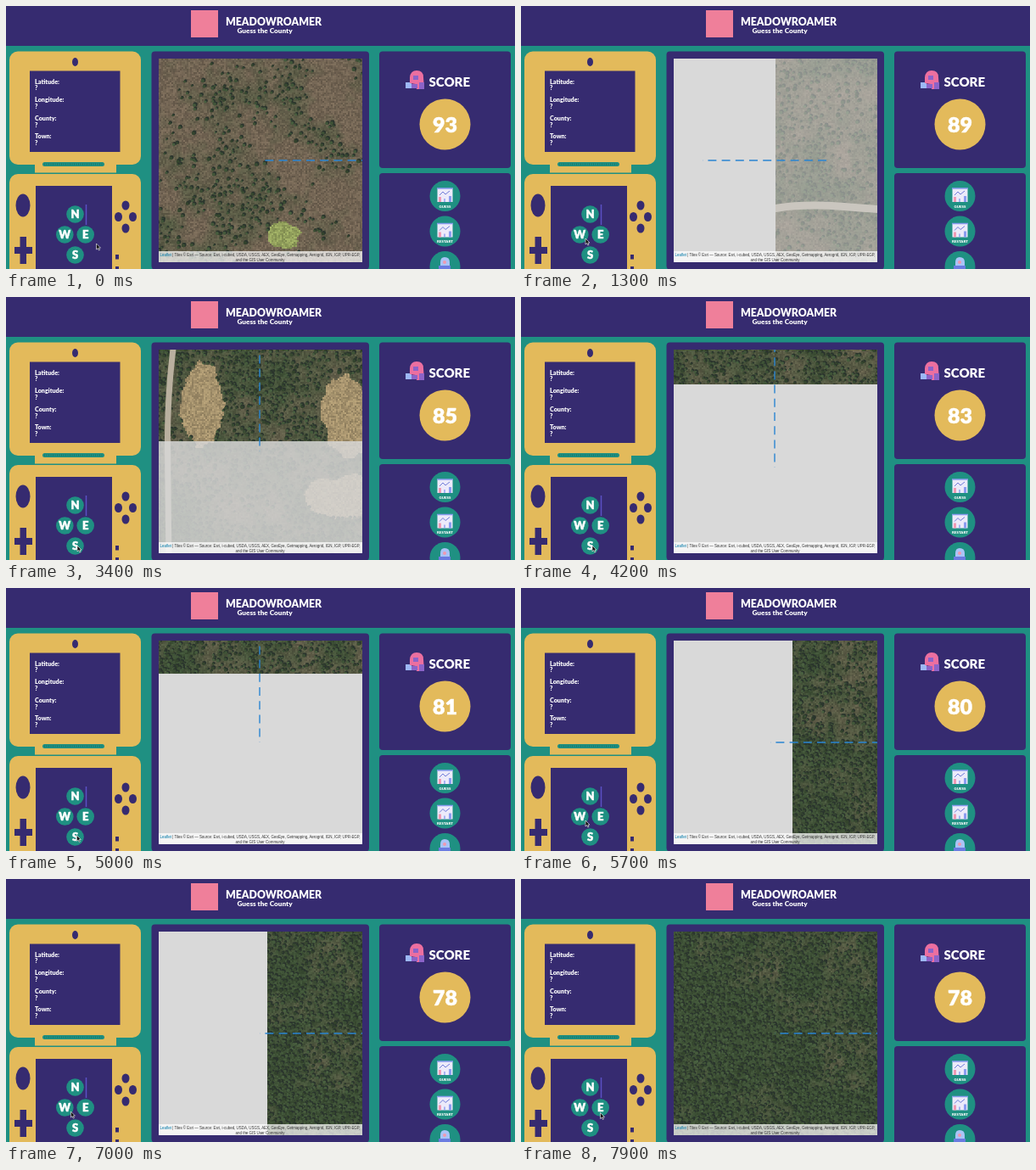
An HTML page with a canvas that plays this animation: 600 by 310 pixels, repeating every 8 s.

```html
<!DOCTYPE html>
<html lang="en">
<head>
<meta charset="utf-8">
<title>Guess the County</title>
<style>
  html, body { margin: 0; width: 100%; height: 100%; overflow: hidden; background: #1f9082; }
  #stage { position: relative; width: 600px; height: 310px; overflow: hidden; }
  svg { position: absolute; inset: 0; }
  canvas { position: absolute; left: 180px; top: 62px; }
  text { font-family: Lato, "Open Sans", sans-serif; font-weight: 900; fill: #fff; }
  .mid { text-anchor: middle; }
  .thick { stroke: #fff; stroke-width: .5; }
  .credit text { font: 4.45px "Liberation Sans", Arial, sans-serif; fill: #333; }
  .p { fill: #362b70; }
  .g { fill: #e3ba5b; }
  .t { fill: #1f9082; }
</style>
</head>
<body>
<div id="stage">
  <svg width="600" height="310" viewBox="0 0 600 310">
    <rect class="t" width="600" height="310"/>
    <rect class="p" width="600" height="47"/>
    <rect x="218" y="5" width="32" height="32" fill="#ef7f9a"/>
    <text x="259" y="22.700" font-size="12.300">MEADOWROAMER</text>
    <text class="mid" x="305" y="32" font-size="8.200">Guess the County</text>

    <!-- upper half of the console -->
    <rect class="g" x="4" y="53.500" width="155" height="133.500" rx="10"/>
    <path class="g" d="M34 186H130V196.500H34Z"/>
    <rect class="t" x="43" y="184" width="73" height="5" rx="2.500"/>
    <path d="M45 186.500H115" stroke="#187468" stroke-width="2" stroke-dasharray="1 1.500"/>
    <ellipse class="p" cx="81.500" cy="66" rx="3.500" ry="5"/>
    <rect class="p" x="28" y="76.500" width="106.500" height="95.500"/>
    <g id="facts" font-size="7.200"></g>

    <!-- lower half of the console -->
    <rect class="g" x="4" y="198" width="155" height="130" rx="10"/>
    <rect class="p" x="35" y="212" width="90" height="100"/>
    <g class="p">
      <ellipse cx="20" cy="235" rx="8.500" ry="13.500"/>
      <path d="M16.500 272h7.500v12h7v8h-7v12h-7.500v-12h-6.500v-8h6.500z"/>
      <g id="keys"></g>
      <rect x="129" y="293" width="4" height="5.500"/>
      <rect x="129" y="307" width="4" height="5"/>
    </g>
    <g id="pad" font-size="13"></g>
    <path d="M94.500 234V258" stroke="#5b50c4" stroke-width="1.500"/>

    <!-- panels -->
    <rect class="p" x="171.500" y="53.500" width="256.500" height="257" rx="4"/>
    <rect class="p" x="440" y="53.500" width="155" height="137.500" rx="4"/>
    <rect class="p" x="440" y="197" width="155" height="120" rx="4"/>

    <!-- score -->
    <path d="M471 90H478V97H471Z" fill="#9db8f5"/>
    <path d="M476 84q1-8 8-8 8 0 8 8l1 14h-9l-1-6-7-1z" fill="#ec6fa0"/>
    <path d="M480 82h6v5h-6zM478 92h7v5h-7zM487 90h6v8h-6z" fill="#8c63c8"/>
    <text x="498.500" y="94.500" font-size="15">SCORE</text>
    <circle class="g" cx="517.500" cy="139.500" r="30"/>
    <text id="score" class="mid thick" x="517.500" y="148.700" font-size="25">93</text>

    <!-- menu buttons -->
    <g id="menu"></g>
    <path d="M512 302q0-6 5-6 6 0 6 6v9h-11z" fill="#a9c4f7"/>
    <path d="M510 306h14v6h-14z" fill="#6a7be0"/>
    <circle cx="517" cy="302" r="2" fill="#ef9ab0"/>

    <path id="cursor" d="M0 0V7L1.700 5.500 2.800 8 4 7.500 2.900 5.100H5Z"
      fill="#111" stroke="#fff" stroke-width=".6"/>
  </svg>
  <canvas id="map" width="240" height="240"></canvas>
  <svg class="credit" width="600" height="310" viewBox="0 0 600 310">
    <rect x="180" y="289" width="240" height="13" fill="#fff" fill-opacity=".72"/>
    <text class="mid" x="299.500" y="294.500"><tspan fill="#0078a8">Leaflet</tspan> | Tiles © Esri — Source: Esri, i-cubed, USDA, USGS, AEX, GeoEye, Getmapping, Aerogrid, IGN, IGP, UPR-EGP,</text>
    <text class="mid" x="299.500" y="300.500">and the GIS User Community</text>
  </svg>
</div>
<script>
const $ = id => document.getElementById(id);
const LOOP = 8000, TICK = 100, STEP = 146, PAN = 250;
const TILE = 103, LATENCY = 380, FADE = 200, ORIGIN = [-498, -149];
const clamp = v => Math.max(0, Math.min(1, v));
const smooth = u => u * u * (3 - 2 * u);
const mix = (a, b, u) => a.map((v, i) => v + (b[i] - v) * u);

// Repeated parts of the interface
$('facts').innerHTML = ['Latitude', 'Longitude', 'County', 'Town'].map((label, i) => {
  const y = 91.5 + i * 21.6;
  return `<text x="34" y="${y}">${label}:</text><text x="34" y="${y + 7.8}">?</text>`;
}).join('');

const around = (x, y, r, ry = r) => [[x, y - ry], [x - r, y], [x + r, y], [x, y + ry]];

$('keys').innerHTML = around(141, 248.5, 8.5, 13.5)
  .map(([x, y]) => `<ellipse cx="${x}" cy="${y}" rx="4.5" ry="5.5"/>`).join('');

$('pad').innerHTML = around(81.5, 269.5, 12.2, 24).map(([x, y], i) =>
  `<circle class="t" cx="${x}" cy="${y}" r="10.3"/>
   <text class="mid thick" x="${x}" y="${y + 4.6}">${'NWES'[i]}</text>`).join('');

$('menu').innerHTML = ['GUESS', 'RESTART', ''].map((label, i) => {
  const y = 224 + i * 41.5, disc = `<circle class="t" cx="517.5" cy="${y}" r="18"/>`;
  return disc + (label && `
    <rect x="508.500" y="${y - 9}" width="18" height="16" fill="#eceafa"/>
    <path d="M508 ${y - 9}h19M517 ${y + 3}v4" stroke="#8a9cf0" stroke-width="1.4"/>
    <path d="M511 ${y - 1}l4-4 3 3 5-4" fill="none" stroke="#6f7bd8"/>
    <rect x="510" y="${y + 1}" width="3" height="6" fill="#f09ab4"/>
    <rect x="522" y="${y}" width="3" height="7" fill="#8c9df0"/>
    <text class="mid" x="517.5" y="${y + 13.5}" font-size="4.4">${label}</text>`);
}).join('');

// Bursts of clicks; clicks and pointer both follow from them
const rest = { W: [76, 274], S: [84, 293], E: [93.5, 275.5] };
const bursts = [
  { dir: 'W', at: 251, count: 4, gap: 330 },
  { dir: 'S', at: 1987, count: 4, gap: 250 },
  { dir: 'S', at: 3700, count: 4, gap: 340 },
  { dir: 'W', at: 5500, count: 2, gap: 460 },
  { dir: 'W', at: 6750, count: 1, gap: 0 }
];
const clicks = [], stops = [{ leave: 0, pos: [106.5, 280] }];
let spot = [0, 0];
for (const { dir, at, count, gap } of bursts) {
  for (let n = 0; n < count; n++) {
    const from = spot;
    spot = dir === 'W' ? [from[0] - STEP, from[1]] : [from[0], from[1] + STEP];
    clicks.push({ at: at + n * gap, from, to: spot });
  }
  stops.push({ arrive: at - 130, leave: at + (count - 1) * gap + 200, pos: rest[dir] });
}
stops.push({ arrive: 7500, leave: LOOP, pos: rest.E });

function pointerAt(t) {
  const i = stops.findIndex(s => s.leave >= t);
  if (i < 1) return stops[0].pos;
  const a = stops[i - 1], b = stops[i];
  return mix(a.pos, b.pos, smooth(clamp((t - a.leave) / (b.arrive - a.leave))));
}

function travel(t) {
  const done = clicks.filter(c => c.at <= t);
  const { at, from, to } = done.at(-1) || { at: -PAN, from: [STEP, 0], to: [0, 0] };
  const left = (1 - clamp((t - at) / PAN)) ** 2;
  return { from, to, cam: mix(to, from, left), score: 93 - done.length };
}

// Landscape in world coordinates; the starting view is centred on 0, 0
function hash(x, y, seed) {
  let h = Math.imul(x, 374761393) ^ Math.imul(y, 668265263) ^ Math.imul(seed, 1274126177);
  h = Math.imul(h ^ (h >>> 13), 1103515245);
  h = Math.imul(h ^ (h >>> 15), 2246822519);
  return ((h ^ (h >>> 16)) >>> 0) / 2 ** 32;
}

function noise(x, y, seed) {
  const i = Math.floor(x), j = Math.floor(y), u = smooth(x - i), v = smooth(y - j);
  const row = k => hash(i, k, seed) * (1 - u) + hash(i + 1, k, seed) * u;
  return row(j) * (1 - v) + row(j + 1) * v;
}

const rough = (x, y) =>
  noise(x / 38, y / 38, 1) * .5 + noise(x / 15, y / 15, 2) * .3 + noise(x / 6, y / 6, 3) * .2 - .5;

const earth = [114, 100, 83], wood = [62, 81, 54];
const tan = [164, 145, 108], lawn = [146, 160, 92], scrub = [116, 103, 80];
const clearings = [
  { x: 30, y: 88, rx: 20, ry: 18, tone: lawn },
  { x: -653, y: 530, rx: 22, ry: 46, tone: tan },
  { x: -483, y: 540, rx: 25, ry: 52, tone: tan },
  { x: -485, y: 637, rx: 38, ry: 25, tone: tan },
  { x: -790, y: 1080, rx: 65, ry: 55, tone: scrub }
];

// Woods thicken to the west and south
const woods = (x, y) => .12 - x * .0007 + y * .0002 + rough(x, y) * 1.3;

function clearingAt(x, y) {
  const r = rough(x + 500, y) * 1.8;
  return clearings.find(c => ((x - c.x) / c.rx) ** 2 + ((y - c.y) / c.ry) ** 2 < 1 + r);
}

const junction = [-580, 69];
const roads = [
  { width: 6, pts: [[-697, -18], [-647, 18], junction] },
  { width: 9, pts: [junction, [-525, 61], [-464, 51], [-370, 58]] },
  { width: 7, pts: [junction, [-586, 109], [-608, 157], [-694, 440], [-691, 720]] }
];

function eachCell(x0, y0, size, draw) {
  const lo = v => Math.floor(v / size) - 1, hi = v => Math.ceil((v + TILE) / size);
  for (let j = lo(y0); j <= hi(y0); j++)
    for (let i = lo(x0); i <= hi(x0); i++) draw(i, j);
}

function paintTile(x0, y0) {
  const tile = document.createElement('canvas');
  tile.width = tile.height = TILE;
  const c = tile.getContext('2d');
  c.translate(-x0, -y0);
  const dot = (x, y, r, tone) => {
    c.fillStyle = `rgb(${tone})`;
    c.beginPath();
    c.arc(x, y, r, 0, 7);
    c.fill();
  };

  eachCell(x0, y0, 2, (i, j) => {
    const x = i * 2, y = j * 2, open = clearingAt(x, y);
    const tone = open ? open.tone : mix(earth, wood, clamp(woods(x, y)));
    const light = .86 + hash(i, j, 4) * .28;
    c.fillStyle = `rgb(${tone.map(v => v * light)})`;
    c.fillRect(x, y, 2, 2);
  });

  eachCell(x0, y0, 5, (i, j) => {
    const x = (i + hash(i, j, 5)) * 5, y = (j + hash(i, j, 6)) * 5;
    if (hash(i, j, 7) > woods(x, y) || clearingAt(x, y)) return;
    const r = 1.2 + hash(i, j, 8) * 1.4, light = .8 + hash(i, j, 9) * .4;
    dot(x + 1, y - 1, r, [42, 52, 45]);
    dot(x, y, r * .8, wood.map(v => v * light));
  });

  c.lineJoin = c.lineCap = 'round';
  c.strokeStyle = '#b9b09f';
  for (const { width, pts } of roads) {
    c.lineWidth = width;
    c.beginPath();
    c.moveTo(...pts[0]);
    for (let k = 1; k < pts.length - 1; k++) c.quadraticCurveTo(...pts[k], ...mix(pts[k], pts[k + 1], .5));
    c.lineTo(...pts.at(-1));
    c.stroke();
  }
  return tile;
}

// Tiles are requested when a pan ends and arrive a little later
const tiles = new Map();
const corner = cam => [Math.round(cam[0] - 119.5), Math.round(cam[1] - 120)];

function eachTile([left, top], visit) {
  const index = (v, axis) => Math.floor((v - ORIGIN[axis]) / TILE);
  for (let j = index(top, 1); j <= index(top + 239, 1); j++)
    for (let i = index(left, 0); i <= index(left + 239, 0); i++)
      visit(i + ',' + j, ORIGIN[0] + i * TILE, ORIGIN[1] + j * TILE);
}

function request(cam, due) {
  eachTile(corner(cam), key => tiles.has(key) || tiles.set(key, { due }));
}
request([0, 0], -FADE);
clicks.forEach(c => request(c.to, c.at + PAN + LATENCY));

const ctx = $('map').getContext('2d');

function drawMap(t, { from, to, cam }) {
  const [left, top] = corner(cam);
  ctx.fillStyle = '#d9d9d9';
  ctx.fillRect(0, 0, 240, 240);
  eachTile([left, top], (key, x, y) => {
    const tile = tiles.get(key);
    if (!tile || t <= tile.due) return;
    tile.image ||= paintTile(x, y);
    ctx.globalAlpha = clamp((t - tile.due) / FADE);
    ctx.drawImage(tile.image, x - left, y - top);
  });

  ctx.globalAlpha = 1;
  ctx.strokeStyle = '#2b85d2';
  ctx.lineWidth = 1.4;
  ctx.setLineDash([10, 6.2]);
  ctx.beginPath();
  ctx.moveTo(from[0] - left, from[1] - top);
  ctx.lineTo(to[0] - left, to[1] - top);
  ctx.stroke();
}

let shown = -1;
function render(now) {
  const t = Math.floor((now % LOOP) / TICK) * TICK;
  if (t === shown) return;
  shown = t;
  const state = travel(t);
  drawMap(t, state);
  $('score').textContent = state.score;
  $('cursor').setAttribute('transform', `translate(${pointerAt(t)})`);
}

const begin = performance.now();
function frame() {
  render(performance.now() - begin);
  requestAnimationFrame(frame);
}
frame();
</script>
</body>
</html>
```
